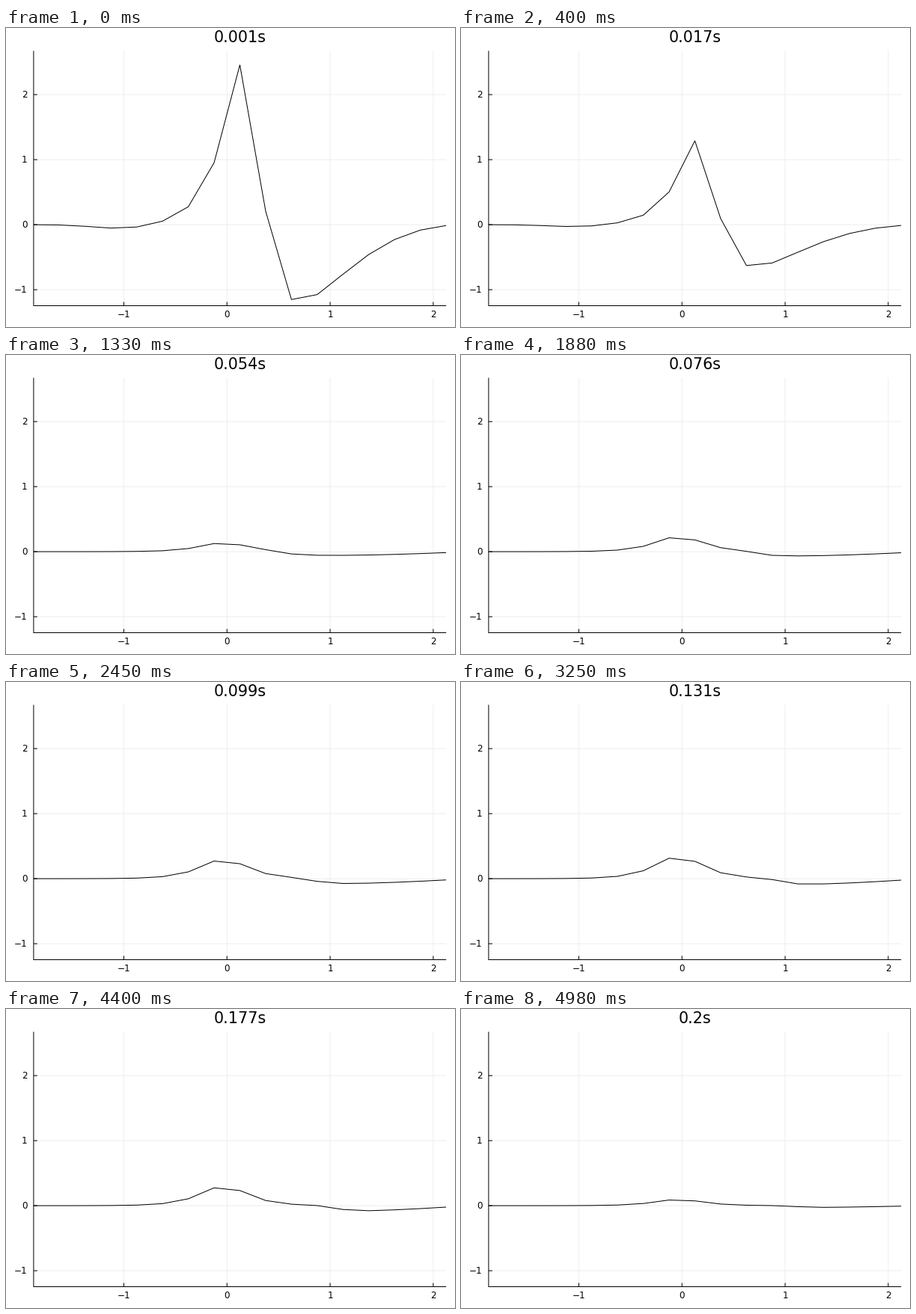
Animation of 600 by 400 pixels, one loop 5.01 s. Source, as a matplotlib script:

```python
import numpy as np
import matplotlib.pyplot as plt
from matplotlib.animation import FuncAnimation

W, H, DPI = 600, 400, 100
PX = 72 / DPI                      # points per pixel
LEFT, RIGHT, TOP, BOTTOM = 36.9, 588.2, 30.5, 371.5
X0, XU, Y0, YU = 295.3, 137.8, 263.1, 87.0
STEPS, TICK = 200, 10
EDGE = 2.35                        # depth where the sink vanishes

x = -1.875 + .25 * np.arange(17)


def sech(u):
    return 1 / np.cosh(u)


def sigmoid(u):
    return .5 * (1 + np.tanh(u / 2))


def spike():
    """Opening pulse: sharp source, broad sink and a faint dip on the left."""
    source = 2.76 * sech(5 * (x - .22))
    sink = .505 * (EDGE - x) ** 2.4 * sigmoid((x - .335) / .04)
    dip = .065 * np.exp(-((x + 1) / .4) ** 2)
    return source - sink - dip


def wave(step):
    """Slow response: a swelling bump and a sink whose front moves outward."""
    fade = np.tanh((206 - step) / 28)
    rise = 1 - np.exp(-max(step - 33, 0) / 48)
    bump = .408 * rise * sech(5 * (x + .03))
    front = max(0, 1.08 - 33 / (step + 1) + .001 * step)
    depth = .035 + .00045 * step
    sink = depth * np.sin(1.1 * (EDGE - x)) * sigmoid((x - front) / .07)
    return fade * (bump - sink)


def profile(step):
    decay = max(0, 1 - step / 34)
    return decay * spike() + (1 - decay) * wave(step)


plt.rcParams["font.family"] = "DejaVu Sans"
fig = plt.figure(figsize=(W / DPI, H / DPI), dpi=DPI, facecolor="white")
ax = fig.add_axes([0, 0, 1, 1])
ax.set_xlim(0, W)
ax.set_ylim(H, 0)
ax.axis("off")


def rule(x1, y1, x2, y2, color="black"):
    ax.plot([x1, x2], [y1, y2], color=color, lw=PX, snap=False,
            solid_capstyle="butt")


def label(px, py, text, size=12, ha="center"):
    return ax.text(px, py, text, fontsize=size * PX, ha=ha, va="baseline")


ticks = [(v, X0 + v * XU, Y0 - v * YU) for v in (-1, 0, 1, 2)]

for _, px, py in ticks:
    rule(px, TOP, px, BOTTOM, "#eeeeee")
    rule(LEFT, py, RIGHT, py, "#eeeeee")

rule(LEFT, TOP, LEFT, BOTTOM + .5)
rule(LEFT, BOTTOM, RIGHT, BOTTOM)
for v, px, py in ticks:
    text = str(v).replace("-", "\u2212")
    rule(px, BOTTOM, px, BOTTOM - 5)
    rule(LEFT, py, LEFT + 5, py)
    label(px, 387, text)
    label(28.5, py + 4, text, ha="right")

curve, = ax.plot(X0 + XU * x, x, color="black", lw=PX, snap=False,
                 solid_joinstyle="miter", solid_capstyle="butt", zorder=3)
title = label(312.5, 19, "", size=20.8)


def draw(tick):
    step = min(2 * tick // 5, STEPS - 1)
    curve.set_ydata(Y0 - YU * profile(step))
    title.set_text(f"{(step + 1) / 1000}s")
    return curve, title


anim = FuncAnimation(fig, draw, frames=501, interval=TICK, repeat=True,
                     repeat_delay=0, cache_frame_data=False)
plt.show()
```
